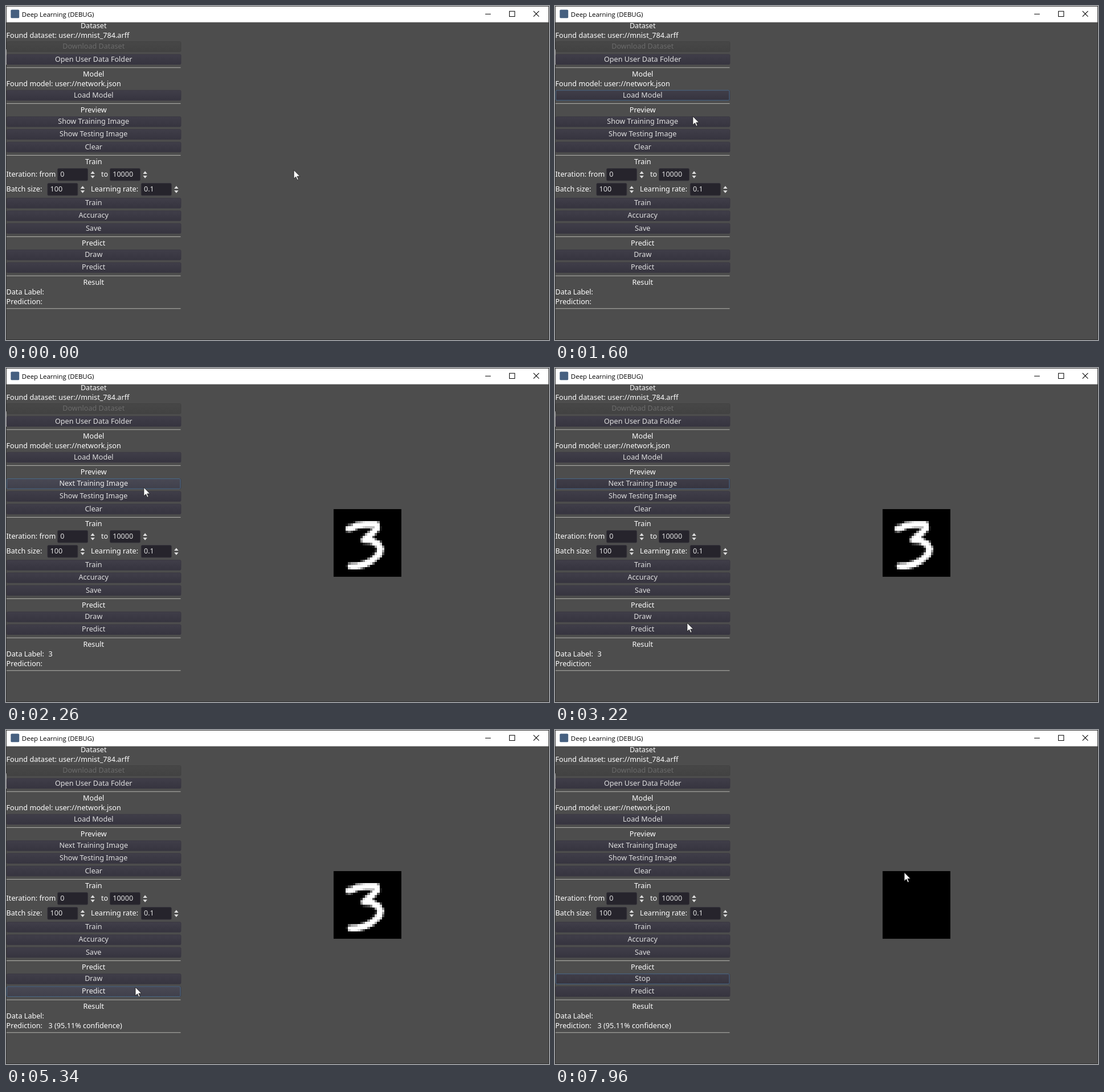
An HTML page that plays this animation: 953 px wide and 587 px high, repeating every 8000 ms.

```html
<!DOCTYPE html>
<html lang="en">
<head>
<meta charset="utf-8">
<title>Deep Learning</title>
<style>
html, body { margin: 0; width: 100%; height: 100%; overflow: hidden; background: #4d4d4d; }
svg { display: block; width: 953px; height: 587px; }
text { font: 13.6px "Noto Sans", "Open Sans", sans-serif; fill: #fff; white-space: pre; }
.mid { text-anchor: middle; }
.soft { fill: #e0e0e0; }
.off { fill: #6b6b6b; }
.title { font: 12.35px "Open Sans", "Noto Sans", sans-serif; fill: #000; }
</style>
</head>
<body>
<svg id="stage" viewBox="0 0 1026 632" preserveAspectRatio="none">
  <defs>
    <linearGradient id="normal" x2="0" y2="1"><stop stop-color="#403e49"/><stop offset="1" stop-color="#36343f"/></linearGradient>
    <linearGradient id="hover" x2="0" y2="1"><stop stop-color="#494955"/><stop offset="1" stop-color="#40404b"/></linearGradient>
    <linearGradient id="pressed" x2="0" y2="1"><stop stop-color="#2b2932"/><stop offset="1" stop-color="#34323c"/></linearGradient>
    <linearGradient id="disabled" x2="0" y2="1"><stop stop-color="#474747"/><stop offset="1" stop-color="#424242"/></linearGradient>
  </defs>
</svg>
<script>
const LOOP = 8000, SCALE = 953 / 1026;
const stage = document.getElementById("stage");

function add(tag, attrs, parent = stage) {
  const el = document.createElementNS("http://www.w3.org/2000/svg", tag);
  for (const k in attrs) el.setAttribute(k, attrs[k]);
  parent.appendChild(el);
  return el;
}
const rect = (x, y, width, height, fill, more) => add("rect", { x, y, width, height, fill, ...more });
function text(x, y, str, cls = "") {
  const el = add("text", { x, y, class: cls });
  el.textContent = str;
  return el;
}

// Window chrome
rect(0, 0, 1026, 632, "#303030");
rect(0, 82, 1, 29, "#b8b8b8");
rect(1, 1, 1024, 30, "#fff");
rect(1, 31, 1024, 600, "#4d4d4d");
rect(9, 7, 16, 16, "#466080", { rx: 2 });
text(30, 20, "Deep Learning (DEBUG)", "title");
add("path", { d: "M905.5 15.4h10.5M951.3 9.9h10v10h-10zM996.7 9.6l10.4 10.4M1007.1 9.6L996.7 20", fill: "none", stroke: "#000", "stroke-width": 1.1 });

// Side panel; y is the offset inside the client area
const TOP = 31, MID = 165.5;
const heading = (y, str) => text(MID, TOP + y + 10.8, str, "mid");
const label = (y, str, x = .6) => text(x, TOP + y + 10.8, str);
const line = y => rect(1, TOP + y + 1, 329, 1.1, "#b2b2ac");

function button(y, str, disabled) {
  const top = TOP + y;
  const box = rect(1.5, top + .5, 329, 19, disabled ? "url(#disabled)" : "url(#normal)",
    { rx: 2, stroke: disabled ? "#414141" : "#3a3841" });
  const ring = rect(1.5, top + .5, 328, 19, "none", { rx: 2, stroke: "#4c6f90" });
  ring.style.display = "none";
  return { top, box, ring, text: text(MID, top + 14, str, "mid " + (disabled ? "off" : "soft")) };
}
function spin(x, y, str) {
  const top = TOP + y, c = x + 66.8;
  rect(x + .5, top + .5, 57, 23, "#26242c", { rx: 2, stroke: "#35333b" });
  text(x + 5.5, top + 16, str, "soft");
  add("path", { d: `M${c - 4} ${top + 10.5}l4-5 4 5zM${c - 4} ${top + 14}l4 5 4-5z`, fill: "#e0e0e0" });
}

heading(0, "Dataset");
label(18, "Found dataset: user://mnist_784.arff");
button(36, "Download Dataset", true);
const open = button(60, "Open User Data Folder");
line(84);
heading(92, "Model");
label(110, "Found model: user://network.json");
const load = button(128, "Load Model");
line(152);
heading(160, "Preview");
const show = button(178, "Show Training Image");
const test = button(202, "Show Testing Image");
const clear = button(226, "Clear");
line(250);
heading(258, "Train");
text(.6, TOP + 292, "Iteration: from");
spin(97, 276, "0");
text(179.8, TOP + 292, "to");
spin(196, 276, "10000");
text(.6, TOP + 320, "Batch size:");
spin(78, 304, "100");
text(160.5, TOP + 320, "Learning rate:");
spin(255, 304, "0.1");
const train = button(332, "Train");
const accuracy = button(356, "Accuracy");
const save = button(380, "Save");
line(404);
heading(412, "Predict");
const draw = button(430, "Draw");
const predict = button(454, "Predict");
line(478);
heading(486, "Result");
label(504, "Data Label:");
label(522, "Prediction:");
const answer = label(504, "", 80.3);
const guess = label(522, "", 80.3);
line(540);
const buttons = [open, load, show, test, clear, train, accuracy, save, draw, predict];

// Canvas with a 28 x 28 handwritten digit
const canvas = rect(619, 267, 128, 128, "#000");
const digit = add("g", { "shape-rendering": "crispEdges" });
const stroke = [[6.3, 8.1], [8, 7.7], [9.8, 6.8], [13, 6.4], [17.6, 6.4], [17.8, 8], [16, 10],
  [13.4, 12], [12.6, 12.8], [15.5, 13], [18.2, 14.4], [19.5, 16.4], [18.9, 18.6], [16.4, 20.9],
  [13.4, 22.6], [10, 23.6], [7.2, 23.7]];
function gap(x, y, [ax, ay], [bx, by]) {
  const dx = bx - ax, dy = by - ay;
  const k = Math.max(0, Math.min(1, ((x - ax) * dx + (y - ay) * dy) / (dx * dx + dy * dy)));
  return Math.hypot(x - ax - k * dx, y - ay - k * dy);
}
const cell = 128 / 28;
for (let r = 0; r < 28; r++) for (let c = 0; c < 28; c++) {
  let d = 99;
  for (let i = 1; i < stroke.length; i++) d = Math.min(d, gap(c + .5, r + .5, stroke[i - 1], stroke[i]));
  const v = Math.round(255 * Math.min(1, 1.85 - d));
  if (v > 12) add("rect", { x: 619 + c * cell, y: 267 + r * cell, width: cell, height: cell, fill: `rgb(${v},${v},${v})` }, digit);
}

const pointer = add("path", { d: "M.5.5V16.6L4.3 13 7 19 9.3 18 6.7 12.2H12z", fill: "#fff", stroke: "#111", "stroke-width": .8 });

// Pointer stops as [time, x, y]; each holds until the next
const stops = [[0, 504.7, 288]];
function glide(t0, t1, n, x, y, ease) {
  const [, x0, y0] = stops[stops.length - 1];
  for (let i = 0; i < n; i++) {
    const k = ease((i + 1) / n);
    stops.push([t0 + (t1 - t0) * i / (n - 1), x0 + (x - x0) * k, y0 + (y - y0) * k]);
  }
}
const smooth = k => k * k * (3 - 2 * k);
const out = k => 1 - (1 - k) * (1 - k);
glide(520, 1160, 9, 246, 137.5, smooth);
glide(1240, 1320, 2, 241.5, 150, out);
stops.push([1540, 241.5, 170], [1600, 241.5, 193.5], [1660, 241.5, 203], [1720, 241.5, 208], [1800, 241.5, 209.6]);
glide(2460, 3220, 12, 231.5, 447.6, smooth);
glide(3280, 3480, 4, 226.6, 463, out);
stops.push([5340, 226.6, 451.6], [5420, 225.6, 434.5]);
glide(5720, 5940, 4, 378.4, 372.4, smooth);
stops.push([7880, 617, 268], [7960, 612.6, 250]);

// Clicks as [button, press, release]
const clicks = [[load, 1460, 1540], [show, 2000, 2180], [predict, 3620, 3760], [draw, 5620, 5720]];

function render(t) {
  const at = stops.filter(s => s[0] <= t + .01).pop();
  const x = at[1] / SCALE, y = at[2] / SCALE;
  pointer.setAttribute("transform", `translate(${x} ${y})`);

  const click = clicks.filter(c => c[1] <= t).pop() || [];
  for (const b of buttons) {
    const focus = b === click[0], down = focus && t < click[2];
    const over = x < 331 && y >= b.top && y < b.top + 20;
    b.box.setAttribute("fill", `url(#${down ? "pressed" : over ? "hover" : "normal"})`);
    b.ring.style.display = focus ? "" : "none";
    b.text.style.fill = over ? "#f0f0f0" : "";
  }

  const shown = t >= 2180, guessed = t >= 3760, drawing = t >= 5720;
  show.text.textContent = shown ? "Next Training Image" : "Show Training Image";
  draw.text.textContent = drawing ? "Stop" : "Draw";
  answer.textContent = shown && !guessed ? "3" : "";
  guess.textContent = guessed ? "3 (95.11% confidence)" : "";
  canvas.style.display = shown ? "" : "none";
  digit.style.display = shown && !drawing ? "" : "none";
}

const start = performance.now();
function tick(now) {
  render(Math.max(0, now - start) % LOOP);
  requestAnimationFrame(tick);
}
render(0);
requestAnimationFrame(tick);
</script>
</body>
</html>
```
